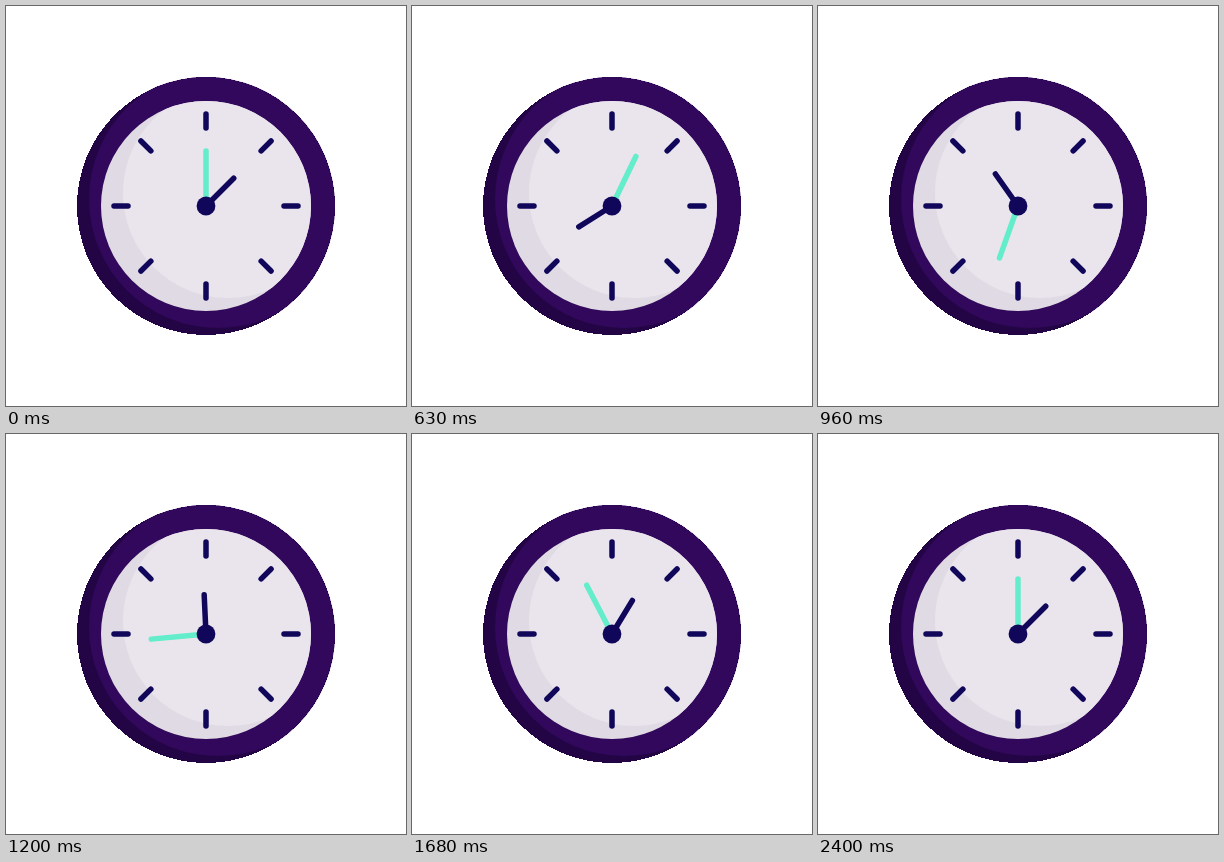
An HTML page for the animation above (4460 ms loop, 400 by 400 pixels).

```html
<!DOCTYPE html>
<html lang="en">
<head>
<meta charset="utf-8">
<title>Clock</title>
<style>
html, body { margin: 0; width: 100%; height: 100%; overflow: hidden; background: #fff; }
svg { display: block; width: 100vw; height: 100vh; }
line { stroke: #10065a; stroke-width: 5.5; stroke-linecap: round; }
#minute { stroke: #64edcb; }
</style>
</head>
<body>
<svg viewBox="0 0 400 400">
  <clipPath id="rim"><circle cx="200" cy="200" r="129" shape-rendering="crispEdges"/></clipPath>
  <clipPath id="face"><circle cx="200" cy="200" r="105"/></clipPath>
  <circle cx="200" cy="200" r="129" fill="#230545" shape-rendering="crispEdges"/>
  <circle cx="212" cy="193" r="129" fill="#31085b" clip-path="url(#rim)"/>
  <circle cx="200" cy="200" r="105" fill="#e0dae4"/>
  <circle cx="222" cy="187" r="105" fill="#eae5ed" clip-path="url(#face)"/>
  <g id="ticks"></g>
  <line id="minute" x1="200" y1="200" x2="200" y2="145"/>
  <line id="hour" x1="200" y1="200" x2="200" y2="160.8"/>
  <circle cx="200" cy="200" r="9.4" fill="#10065a"/>
</svg>
<script>
const LOOP = 4460, SPIN = 2400, STEP = 30;
const get = id => document.getElementById(id);
const turn = (id, deg) => get(id).setAttribute('transform', `rotate(${deg} 200 200)`);

get('ticks').innerHTML = Array.from({ length: 8 }, (_, i) =>
  `<line x1="200" y1="108" x2="200" y2="122" transform="rotate(${i * 45} 200 200)"/>`).join('');

// cubic-bezier(1/3, 0, 0, 1), solved by bisection
function ease(x) {
  if (x >= 1) return 1;
  let lo = 0, hi = 1;
  for (let i = 0; i < 30; i++) {
    const s = (lo + hi) / 2;
    if (s * (1 - s) ** 2 + s ** 3 < x) lo = s; else hi = s;
  }
  return lo * lo * (3 - 2 * lo);
}

function draw(now) {
  const t = Math.floor((now % LOOP) / STEP) * STEP;
  const p = ease(t / SPIN);
  turn('minute', 720 * p);
  turn('hour', 45 + 360 * p);
}

const start = performance.now();
function frame() {
  draw(performance.now() - start);
  requestAnimationFrame(frame);
}
frame();
</script>
</body>
</html>
```
